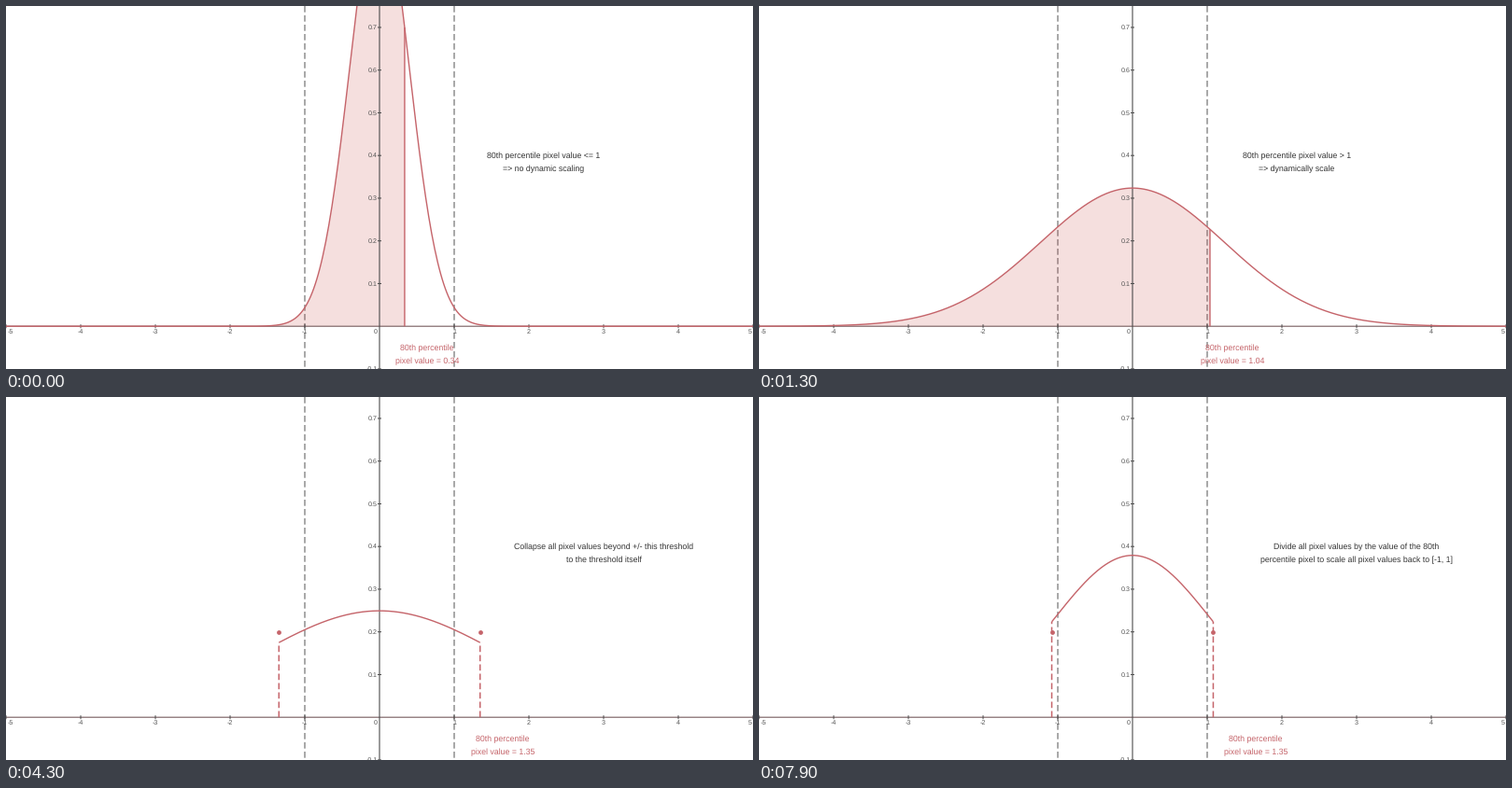
A matplotlib script for the animation above (8000 ms loop, 800 by 389 pixels).

```python
import numpy as np
import matplotlib.pyplot as plt
from matplotlib.animation import FuncAnimation

W, H, DPI = 800, 389, 100
STEP, FRAMES = 100, 80
UX, UY = 80, 457.5            # pixels per unit
X0, Y0 = 400, 343.2           # origin in pixels
Z80 = 0.8416                  # 80th percentile of the unit normal
RED, SHADE = "#c5646a", "#c74440"
AXIS, DASH, INK, TICK = "#4a4a4a", "#858585", "#333333", "#555555"

NOTES = [
    (0, 2.2, "80th percentile pixel value <= 1", "=> no dynamic scaling"),
    (1300, 2.2, "80th percentile pixel value > 1", "=> dynamically scale"),
    (3100, 3.0, "Collapse all pixel values beyond +/- this threshold",
     "to the threshold itself"),
    (5600, 3.0, "Divide all pixel values by the value of the 80th",
     "percentile pixel to scale all pixel values back to [-1, 1]"),
]

plt.rcParams.update({"font.family": "Liberation Sans", "text.hinting": "none",
                     "path.snap": False})
fig = plt.figure(figsize=(W / DPI, H / DPI), dpi=DPI, facecolor="white")
ax = fig.add_axes([0, 0, 1, 1])
ax.set_xlim(-X0 / UX, (W - X0) / UX)
ax.set_ylim((Y0 - H) / UY, Y0 / UY)
ax.axis("off")


def pt(px):
    return px * 72 / DPI


def row(px):
    return (Y0 - px) / UY


def label(x, y_px, text="", size=8.75, color=INK, ha="center"):
    return ax.text(x, row(y_px), text, fontsize=pt(size), color=color,
                   ha=ha, va="baseline", zorder=6)


def line(color=RED, px=1.4, z=5, **kw):
    return ax.plot([], [], color=color, lw=pt(px), zorder=z,
                   solid_capstyle="butt", dash_capstyle="butt", **kw)[0]


def dashed(color, px, z=5):
    return line(color, px, z, ls=(0, (6.7 / px, 3.3 / px)))


def draw_grid():
    line("#755a5d", 1.1, 3).set_data([-5, 5], [0, 0])
    line(AXIS, 1.1, 4).set_data([0, 0], [row(0), row(H)])
    for x in (-1, 1):
        dashed(DASH, 1.4, 2).set_data([x, x], [row(0), row(H)])
    for k in range(-5, 6):
        x = {-5: -4.94, 0: -0.055, 5: 4.96}.get(k, k)
        label(x, 351.2, str(k), 7.2, TICK)
        if k:
            line(AXIS, 1, 4).set_data([k, k], [-2 / UY, 2 / UY])
    for k in [-1, *range(1, 8)]:
        label(-0.03, Y0 - k * UY / 10 + 2.2, f"{k / 10:.1f}", 7.2, TICK, "right")
        line(AXIS, 1, 4).set_data([-2 / UX, 2 / UX], [k / 10, k / 10])


def normal(x, s):
    return np.exp(-(x / s) ** 2 / 2) / (s * np.sqrt(2 * np.pi))


def widen(t):
    return np.clip(0.87 + 0.0906 * (t - 900) / 100, 0.4, 1.6)


def squeeze(t):
    """Spread and cut-off while the values are scaled back."""
    u = (t - 7200) / 100
    return min(1.6, 1.437 - 0.055 * u), min(1.6 * Z80, 1.269 - 0.0269 * u)


draw_grid()
curve = line()
edges = [line() for _ in range(2)]
stems = [dashed(RED, 1.5) for _ in range(2)]
dots = line(ls="none", marker="o", ms=pt(4.8), mew=0)
fills = [ax.fill([0], [0], color=SHADE, alpha=0.17, lw=0, zorder=2.5)[0]
         for _ in range(2)]
notes = [label(0, y) for y in (163.2, 177.2)]
tags = [label(0, y, color=RED) for y in (369.4, 383.1)]
tags[0].set_text("80th percentile")


def shade(patch, a, b, s):
    x = np.linspace(a, b, 240)
    patch.set_xy(np.column_stack([np.r_[a, x, b], np.r_[0, normal(x, s), 0]]))


def update(i):
    t = i * STEP
    s = widen(t)
    q = cut = Z80 * s
    collapsed, tails = t >= 4300, 3100 <= t < 4300
    if collapsed:
        s, cut = squeeze(t)

    span = cut if collapsed else 5.05
    x = np.linspace(-span, span, 500)
    curve.set_data(x, normal(x, s))

    shade(fills[0], -5.05, -cut if tails else cut, s)
    shade(fills[1], cut, 5.05, s)
    fills[0].set_visible(not collapsed)
    fills[1].set_visible(tails)

    top = normal(cut, s)
    for side, edge, stem in zip((1, -1), edges, stems):
        for part in (edge, stem):
            part.set_data([side * cut] * 2, [0, top])
        edge.set_visible(tails or (side == 1 and not collapsed))
        stem.set_visible(collapsed)
    dots.set_data([-cut, cut], [0.2, 0.2])
    dots.set_visible(collapsed)

    _, cx, *words = [n for n in NOTES if n[0] <= t][-1]
    for note, text in zip(notes, words):
        note.set_text(text)
        note.set_x(cx)
    tags[1].set_text(f"pixel value = {q:.2f}")
    for tag in tags:
        tag.set_x(q + 0.3)
    return [curve, dots, *edges, *stems, *fills, *notes, *tags]


anim = FuncAnimation(fig, update, frames=FRAMES, interval=STEP,
                     repeat=True, repeat_delay=0, blit=False)
plt.show()
```
